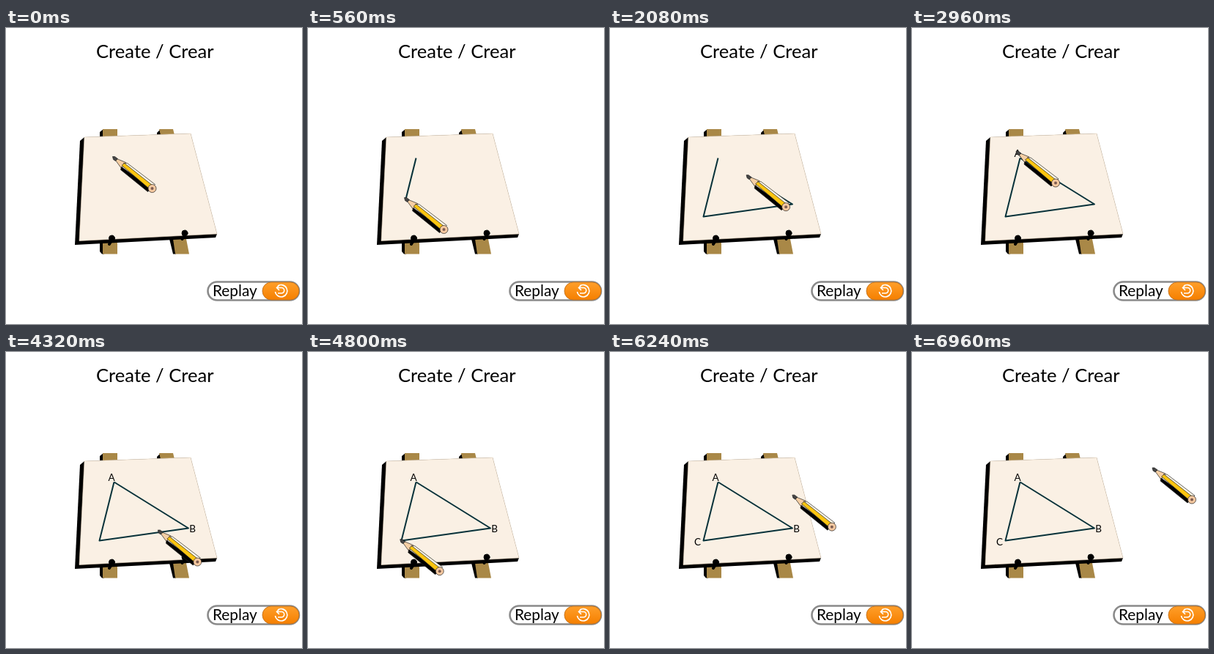
These frames come from a looping animation (404 by 404 pixels, 7120 ms). An HTML page:

```html
<!DOCTYPE html>
<html lang="en">
<head>
<meta charset="utf-8">
<title>Create / Crear</title>
<style>
  html, body { margin: 0; width: 100%; height: 100%; overflow: hidden; background: #fff; }
  svg { display: block; width: 100%; height: 100%; }
  text { font-family: Lato, sans-serif; }
  .label { font-size: 13.5px; text-anchor: middle; }
</style>
</head>
<body>
<svg viewBox="0 0 404 404">
  <defs>
    <linearGradient id="orange" x2="0" y2="1">
      <stop offset="0" stop-color="#ff9f2a"/>
      <stop offset="1" stop-color="#f57f00"/>
    </linearGradient>
    <g id="peg" stroke="#000" stroke-linecap="round">
      <circle r="4"/>
      <path d="M0 2L-3.500 8" stroke-width="4"/>
    </g>
  </defs>

  <text x="123" y="41" font-size="25.6">Create / Crear</text>

  <!-- Easel legs: dark sides, then fronts -->
  <path d="M128 142L133 138V150H128ZM206 143L211 138L214 150H206ZM128 290H134V308.500H131L128 305ZM223 288H230L232 308.500H228Z"/>
  <path fill="#a98847" d="M132 138H152V150H132ZM209 138H228L231 150H212ZM132 290H152V308.500H132ZM228 288H246L250 308.500H231Z"/>

  <!-- Board -->
  <path d="M107 149L101 154L94 296L286 286L288 281L252 144Z"/>
  <path fill="#faf0e4" stroke="#ead9c3" stroke-width=".6" d="M107 149L252 144L288 281L100 290.500Z"/>
  <use href="#peg" x="144.5" y="287"/>
  <use href="#peg" x="244" y="280"/>

  <polyline id="trail" fill="none" stroke="#08323a" stroke-width="2" stroke-linejoin="round"/>
  <text class="label" x="144" y="175.5">A</text>
  <text class="label" x="254.5" y="246">B</text>
  <text class="label" x="119.5" y="264">C</text>

  <!-- Replay button -->
  <rect x="275.5" y="346.5" width="124.5" height="25" rx="12.5" fill="#fff" stroke="#8a8a8a" stroke-width="2.6"/>
  <rect x="350" y="347" width="50" height="24" rx="12" fill="url(#orange)" stroke="#c8741c"/>
  <text x="282" y="366" font-size="20.8">Replay</text>
  <g fill="none" stroke="#fff" stroke-width="1.6">
    <path d="M367.500 360A8.200 8.200 0 1 0 371 352"/>
    <path d="M373 351L369.500 354.500L373 358M370 354.500H376A3.500 3.500 0 0 1 376 362H371"/>
  </g>

  <!-- Pencil, with its tip at the origin -->
  <g id="pencil" stroke="#222" stroke-width=".7" stroke-linejoin="round">
    <path fill="#f6cfa4" d="M1 1L18 8L12 16Z"/>
    <path fill="#444" d="M0 0L3 0L7 3L4 6L1 4Z"/>
    <path fill="#000" d="M12 14L11 18L48 48L53 43Z"/>
    <path fill="#fff8e8" d="M15 9H20L58 38L54 41Z"/>
    <path fill="#fdc510" d="M12.500 12L16 9L54 39L49 43Z"/>
    <circle cx="54" cy="43.500" r="5.500" fill="#f6c9a0"/>
    <circle cx="54" cy="43.500" r="2" fill="#7d5c50" stroke="none"/>
  </g>
</svg>
<script>
const LOOP = 7120, STEP = 80, SIDE = 800;
const A = [147.5, 177.5], B = [249, 240.5], C = [127.5, 257.5];
const outline = [A, C, B, A];

// After drawing, the pencil writes each letter and then leaves the board
const moves = [
  { start: 2560, end: 2960, to: [142, 168], ease: 0, hop: 13 },
  { start: 3440, end: 3920, to: [253, 236], ease: .4, hop: 0 },
  { start: 4160, end: 4960, to: [117, 257], ease: .85, hop: 0 },
  { start: 5520, end: 6960, to: [328, 158], ease: .5, hop: 0 }
];

const pencil = document.getElementById("pencil");
const trail = document.getElementById("trail");
const labels = document.querySelectorAll(".label");
const clamp = u => Math.min(Math.max(u, 0), 1);
const mix = (p, q, k) => p.map((v, i) => v + (q[i] - v) * k);

function trailAt(t) {
  const progress = Math.min(t / SIDE, 3), side = Math.min(Math.floor(progress), 2);
  return [...outline.slice(0, side + 1), mix(outline[side], outline[side + 1], progress - side)];
}

function tipAt(t, [x, y]) {
  let tip = [x - 2, y - 2];
  for (const { start, end, to, ease, hop } of moves) {
    const u = clamp((t - start) / (end - start));
    tip = mix(tip, to, u + ease * u * (1 - u));
    tip[1] -= hop * Math.sin(Math.PI * u);
  }
  return tip;
}

function draw(now) {
  const t = Math.floor((now % LOOP) / STEP) * STEP;
  const points = trailAt(t);
  trail.setAttribute("points", points.join(" "));
  pencil.setAttribute("transform", `translate(${tipAt(t, points.at(-1))})`);
  labels.forEach((label, i) => {
    label.setAttribute("visibility", t >= moves[i].end ? "visible" : "hidden");
  });
}

const start = performance.now();
function tick() {
  draw(performance.now() - start);
  requestAnimationFrame(tick);
}
tick();
</script>
</body>
</html>
```
